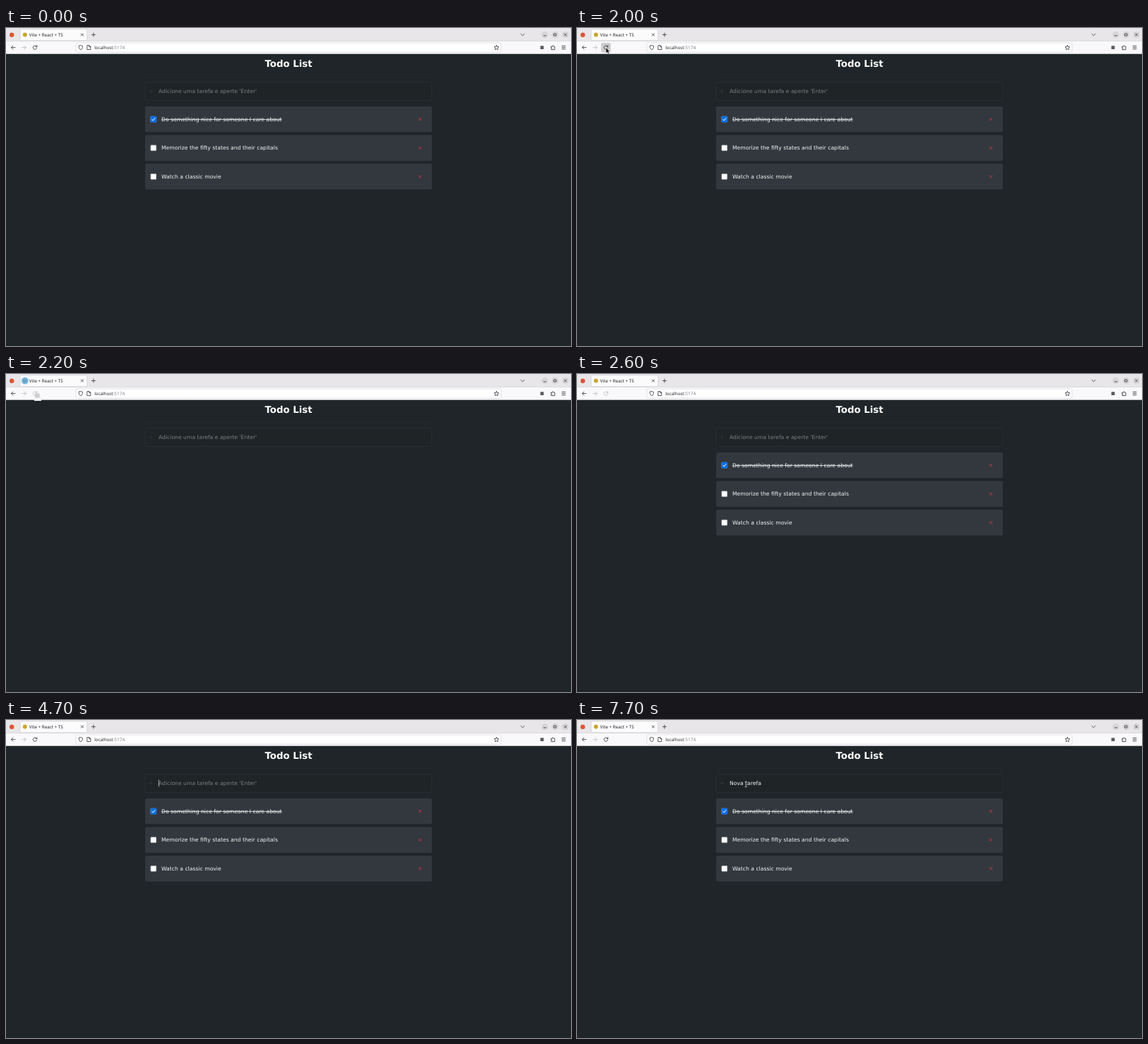
These frames come from a looping animation (800x450 px, 8000 ms). An HTML page:

```html
<!DOCTYPE html>
<html lang="pt">
<head>
<meta charset="utf-8">
<title>Todo List</title>
<style>
html, body { margin: 0; width: 100%; height: 100%; overflow: hidden; background: #1f2528; }
svg { display: block; width: 800px; height: 450px; }
text { font: 7.667px "DejaVu Sans", sans-serif; fill: #f4f5f6; text-rendering: geometricPrecision; white-space: pre; }
.ui text { font: 6.25px "Noto Sans", "Open Sans", sans-serif; fill: #222226; }
.icon { fill: none; stroke: #3a3a3f; stroke-width: .85; stroke-linecap: round; stroke-linejoin: round; }
#title { font-size: 13.333px; font-weight: bold; text-anchor: middle; fill: #fff; }
#hint { fill: #7a7f82; }
.done { text-decoration: line-through; }

/* 8 s clock: 1.25% = 100 ms */
.step { animation: 8s step-end infinite; }
#pointer { animation-name: move; }
#arrow { animation-name: arrow; }
#beam { animation-name: beam; }
#button { animation-name: button; }
#reload { animation-name: reload; }
#spin, #blank, #dot { animation-name: blank; }
#patch { animation-name: patch; }
#list { animation-name: list; }
#favicon { animation-name: favicon; }
#burst { animation-name: burst; transform-origin: 26.8px 9.5px; }
#hint { animation-name: hint; }
#caret { animation-name: blink; }
.typed { animation-name: type; }

@keyframes move {
  0% { transform: translate(22px, 264px); }
  3.75% { transform: translate(22px, 264px); animation-timing-function: steps(4); }
  8.75% { transform: translate(170px, 140px); animation-timing-function: steps(4); }
  13.75% { transform: translate(93px, 37px); animation-timing-function: steps(5); }
  20% { transform: translate(41px, 28px); }
  35% { transform: translate(41px, 28px); animation-timing-function: steps(9); }
  46.25% { transform: translate(233px, 89px); }
  47.5%, 100% { transform: translate(239.2px, 91px); }
}
@keyframes arrow {
  0% { opacity: 0; } 3.75% { opacity: 1; } 26.25% { opacity: 0; }
  36.25% { opacity: 1; } 45%, 100% { opacity: 0; }
}
@keyframes beam {
  0% { opacity: 0; } 45% { opacity: 1; }
  50%, 58.75%, 65%, 95% { opacity: 0; }
  51.25%, 60%, 66.25%, 96.25%, 100% { opacity: 1; }
}
@keyframes button {
  0% { fill: transparent; } 20% { fill: #e0e0e2; }
  25% { fill: #cdcdcf; } 27.5%, 100% { fill: transparent; }
}
@keyframes reload {
  0% { opacity: 1; } 26.25% { opacity: 0; }
  27.5% { opacity: .32; } 36.25%, 100% { opacity: 1; }
}
@keyframes blank { 0% { opacity: 0; } 26.25% { opacity: 1; } 27.5%, 100% { opacity: 0; } }
@keyframes patch { 0% { opacity: 0; } 27.5% { opacity: 1; } 28.75%, 100% { opacity: 0; } }
@keyframes list { 0% { opacity: 1; } 26.25% { opacity: 0; } 28.75%, 100% { opacity: 1; } }
@keyframes favicon { 0% { opacity: 1; } 26.25% { opacity: 0; } 27.5%, 100% { opacity: 1; } }
@keyframes burst {
  0% { opacity: 0; } 27.5% { opacity: .75; transform: scale(1); }
  28.75% { opacity: .4; transform: scale(1.1); }
  30% { opacity: .15; transform: scale(1.15); } 31.25%, 100% { opacity: 0; }
}
@keyframes hint { 0% { opacity: 1; } 70%, 100% { opacity: 0; } }
@keyframes blink {
  0% { opacity: 0; } 50% { opacity: 1; } 65% { opacity: 0; }
  70% { opacity: 1; } 95%, 100% { opacity: 0; }
}
@keyframes type {
  0% { transform: translateX(0); }
  70% { transform: translateX(5.7px); }
  72.5% { transform: translateX(10.4px); }
  75% { transform: translateX(15px); }
  76.25% { transform: translateX(19.7px); }
  77.5% { transform: translateX(22.1px); }
  80% { transform: translateX(25.1px); }
  81.25% { transform: translateX(29.8px); }
  82.5% { transform: translateX(33px); }
  85% { transform: translateX(37.7px); }
  87.5% { transform: translateX(40.4px); }
  90%, 100% { transform: translateX(45.3px); }
}
</style>
</head>
<body>
<svg viewBox="0 0 800 450">
  <defs>
    <clipPath id="reveal"><rect class="step typed" x="146" y="80" width="70" height="18"/></clipPath>
    <g id="row">
      <rect x="197" width="406" height="36.4" rx="2" fill="#32383d"/>
      <path d="M583.8 16l4.4 4.4m0-4.4l-4.4 4.4" stroke="#c73248" stroke-width=".9"/>
      <rect x="204.8" y="14.2" width="8" height="8" rx="1" fill="#fff" stroke="#8f8f9d" stroke-width=".7"/>
    </g>
    <path id="cross" d="M-1.6-1.6l3.2 3.2m0-3.2l-3.2 3.2"/>
  </defs>

  <!-- page -->
  <rect y="36" width="800" height="414" fill="#1f2528"/>
  <text id="title" x="400" y="55.4">Todo List</text>
  <path d="M197 68h406" stroke="#282e31" stroke-width=".6"/>
  <rect x="197" y="76.7" width="406" height="25.6" rx="2" fill="#1f2427" stroke="#30363a" stroke-width=".6"/>
  <path d="M202 89.4h6m-3-3v6" stroke="#353b3f" stroke-width=".7"/>
  <text id="hint" class="step" x="216" y="92">Adicione uma tarefa e aperte 'Enter'</text>
  <g clip-path="url(#reveal)"><text x="216" y="92">Nova tarefa</text></g>
  <g id="caret" class="step"><rect class="step typed" x="215.9" y="84.5" width=".7" height="9.8" fill="#e8eaeb"/></g>

  <g id="list" class="step">
    <use href="#row" y="110.9"/>
    <use href="#row" y="151.5"/>
    <use href="#row" y="192.1"/>
    <rect x="204.5" y="124.8" width="8.6" height="8.6" rx="1" fill="#0a6fe4"/>
    <path d="M206.6 129.2l1.6 1.8 3-3.8" fill="none" stroke="#fff" stroke-width="1"/>
    <text class="done" x="220" y="131.7">Do something nice for someone I care about</text>
    <text x="220" y="172.3">Memorize the fifty states and their capitals</text>
    <text x="220" y="212.9">Watch a classic movie</text>
  </g>

  <g id="blank" class="step ui">
    <rect y="36" width="800" height="414" fill="#fdfdfe"/>
    <path d="M-1 441.6h29a1.6 1.6 0 0 1 1.6 1.6v8" fill="#f9f9fb" stroke="#c4c4c8" stroke-width=".6"/>
    <text x="1.5" y="448.2">localhost</text>
  </g>

  <!-- browser frame -->
  <g class="ui">
    <rect width="800" height="18.8" fill="#e8e6e8"/>
    <rect y="18.5" width="800" height="18" fill="#f9f9fb"/>
    <path d="M0 36.5h800" stroke="#ccccd0" stroke-width=".7"/>
    <path d="M0 18.5h800" stroke="#dcdbde" stroke-width=".5"/>
    <rect x="20" y="1.8" width="94.8" height="16" rx="1.7" fill="#fbfbfc" stroke="#c8c7ca" stroke-width=".6"/>
    <circle cx="8.2" cy="9.7" r="3.2" fill="#dc5534"/>
    <circle id="favicon" class="step" cx="26.8" cy="9.5" r="2.9" fill="#c9a52c"/>
    <circle id="burst" class="step" cx="26.8" cy="9.5" r="5" fill="#4aa3e8"/>
    <circle id="dot" class="step" cx="25" cy="9.5" r=".9" fill="#55555c"/>
    <text x="32.8" y="11.9">Vite + React + TS</text>

    <g fill="#d7d5d8">
      <circle cx="763" cy="9.5" r="4.7"/><circle cx="777.5" cy="9.5" r="4.7"/><circle cx="792" cy="9.5" r="4.7"/>
    </g>
    <g class="icon">
      <use href="#cross" x="107.9" y="9.5"/>
      <path d="M121.4 9.5h5m-2.5-2.5v5M729 8.4l2.5 2.4 2.5-2.4M761.3 10.9h3.4M776 8h3v3h-3z"/>
      <use href="#cross" x="792.1" y="9.5"/>
    </g>

    <rect id="button" class="step" x="34.2" y="21" width="13.6" height="13.4" rx="1.7" fill="transparent"/>
    <rect x="99" y="21" width="602" height="13.2" rx="1.7" fill="#fff" stroke="#cfcfd4" stroke-width=".6"/>
    <g class="icon">
      <path d="M13 27.6h-5.6m2.5-2.5l-2.5 2.5 2.5 2.5"/>
      <path d="M22.8 27.6h5.6m-2.5-2.5l2.5 2.5-2.5 2.5" stroke="#bbbbc0"/>
      <g id="reload" class="step">
        <path d="M43.6 28.3a2.7 2.7 0 1 1-.8-2.7l.8.8M43.8 24.7v1.9h-1.9"/>
      </g>
      <g id="spin" class="step">
        <path d="M38.3 27.1a2.8 2.8 0 0 1 5-.8M43.8 28.1a2.8 2.8 0 0 1-5 .8M43.8 24.9v1.7h-1.7M38.3 30.4v-1.7h1.7"/>
      </g>
      <path d="M105.8 24.5l2.6.9c.2 2.8-.6 4.3-2.6 5.5-2-1.2-2.8-2.7-2.6-5.5z"/>
      <path d="M115.2 24.6h2.8l1.8 1.8v4.2h-4.6zM117.8 24.8v1.8h1.8"/>
      <path d="M694.5 24.4l1 2.1 2.3.3-1.7 1.6.4 2.3-2-1.1-2 1.1.4-2.3-1.7-1.6 2.3-.3z"/>
      <path d="M772 26.2h1.6c-.5-1.8 2.1-1.8 1.6 0h1.8v4.4h-5v-1.4c1.6.4 1.6-1.9 0-1.5z"/>
      <path d="M787.2 25.4h4.8m-4.8 2.2h4.8m-4.8 2.2h4.8"/>
    </g>
    <rect x="756.6" y="25.2" width="4.8" height="4.8" rx=".6" fill="#5a5a60"/>
    <text x="125.2" y="29.9">localhost</text>
    <text x="151.6" y="29.9" style="fill:#85858c;font-size:6.5px">:5174</text>
  </g>

  <g id="patch" class="step">
    <rect x="40" y="33.5" width="10" height="4.5" fill="#f4f4f6"/>
    <rect x="41" y="27.5" width="6.6" height="6" fill="#cdcdd0"/>
  </g>

  <g id="pointer" class="step">
    <path id="arrow" class="step" d="M0 0v7.6l1.8-1.6 1.3 2.8 1.4-.7-1.3-2.7h2.3z" fill="#111" stroke="#f5f5f5" stroke-width=".5"/>
    <g id="beam" class="step" fill="none">
      <path d="M-1.5-3.6h3M0-3.6v7.2M-1.5 3.6h3" stroke="#111" stroke-width="1.5"/>
      <path d="M-1.5-3.6h3M0-3.6v7.2M-1.5 3.6h3" stroke="#eee" stroke-width=".8"/>
    </g>
  </g>
</svg>
</body>
</html>
```
